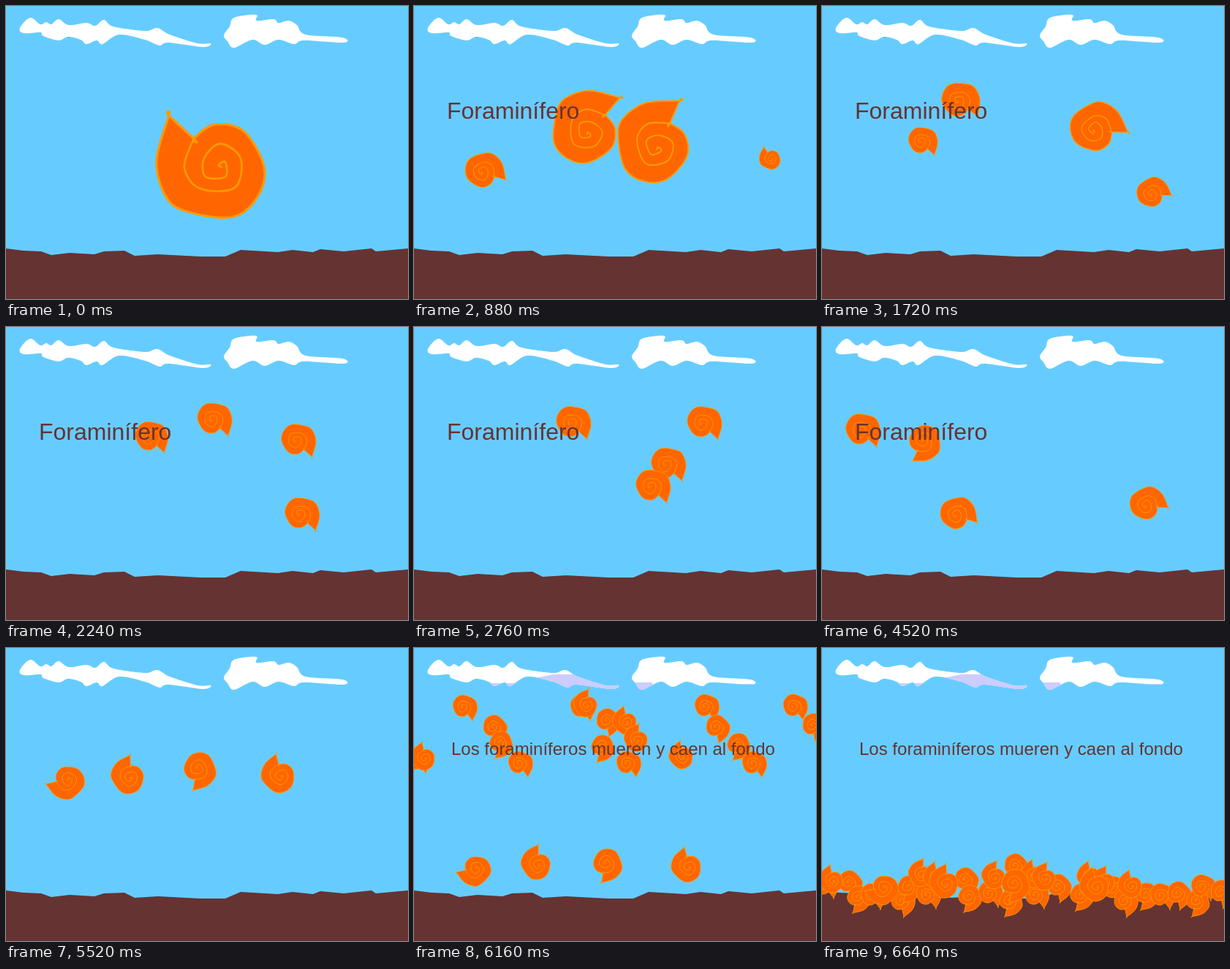
Write an HTML page with a canvas that moves like this. It is 550 px wide and 400 px high and loops after 9.8 s.

```html
<!DOCTYPE html>
<html lang="es">
<head>
<meta charset="utf-8">
<title>Foraminífero</title>
<style>
html, body { margin: 0; width: 100%; height: 100%; overflow: hidden; background: #6cf; }
canvas { display: block; }
</style>
</head>
<body>
<canvas id="stage" width="550" height="400"></canvas>
<script>
const ctx = document.getElementById('stage').getContext('2d');
const LOOP = 9800, STEP = 40, LAST = 166;
const SKY = '#66ccff', EARTH = '#663333';

// Smooth curve through a flat list of x, y pairs.
function curve(flat, closed) {
  const n = flat.length / 2;
  const at = i => {
    const k = closed ? (i + n) % n : Math.max(0, Math.min(n - 1, i));
    return [flat[2 * k], flat[2 * k + 1]];
  };
  const path = new Path2D();
  path.moveTo(...at(0));
  for (let i = 0; i < (closed ? n : n - 1); i++) {
    const [a, b, c, d] = [at(i - 1), at(i), at(i + 1), at(i + 2)];
    path.bezierCurveTo(b[0] + (c[0] - a[0]) / 6, b[1] + (c[1] - a[1]) / 6,
      c[0] - (d[0] - b[0]) / 6, c[1] - (d[1] - b[1]) / 6, c[0], c[1]);
  }
  return path;
}

function polygon(flat) {
  const path = new Path2D();
  for (let i = 0; i < flat.length; i += 2) path.lineTo(flat[i], flat[i + 1]);
  path.closePath();
  return path;
}

const leftCloud = curve([19,30, 33,16, 47,25, 55,22, 62,25, 72,18, 86,26, 110,23, 122,27,
  134,19, 147,28, 190,34, 207,30, 224,39, 262,51, 280,51, 270,56, 222,50, 210,54, 190,46,
  155,39, 132,52, 124,47, 110,52, 102,46, 85,42, 72,47, 51,41, 47,36, 24,37], true);
const rightCloud = curve([298,40, 306,28, 312,16, 342,12, 343,20, 366,18, 373,23, 387,20,
  398,26, 410,39, 460,43, 462,50, 408,47, 394,52, 373,46, 354,53, 337,46, 312,57, 303,48], true);
const leftShade = polygon([152,44, 190,36, 225,36, 285,45, 285,60, 100,60, 100,48, 135,48]);
const rightShade = new Path2D('M300 47h26v13h-26zM403 49h62v13h-62z');

const ground = polygon([0,331, 24,334, 48,335, 62,340, 87,337, 121,339, 134,335, 162,334,
  176,341, 208,339, 266,342, 300,342, 321,333, 372,336, 392,333, 420,336, 430,332, 462,335,
  500,331, 506,335, 550,331, 550,400, 0,400]);

// The shell is drawn around its spiral centre, at full size with the tip up left.
const CENTRE = [292, 218];
const body = curve([260,184, 223,150, 223,150, 206,212, 220,262, 250,281, 309,288,
  343,262, 353,220, 325,171, 285,162, 257,181], true);
const spiral = curve([257,181, 244,220, 265,249, 313,248, 321,208, 293,188, 271,208,
  273,233, 300,233, 300,213, 291,217, 295,220]);

function drawShell([x, y, scale = .32, turn = 180]) {
  ctx.save();
  ctx.translate(x, y);
  ctx.rotate(turn * Math.PI / 180);
  ctx.scale(scale, scale);
  ctx.translate(-CENTRE[0], -CENTRE[1]);
  ctx.fillStyle = '#ff6600';
  ctx.strokeStyle = '#ff9900';
  ctx.lineWidth = Math.max(2.8, 0.85 / scale);
  ctx.lineJoin = ctx.lineCap = 'round';
  ctx.fill(body);
  ctx.stroke(body);
  ctx.stroke(spiral);
  ctx.restore();
}

// Keys: step, x, y, scale, turn; linear in between, then a straight fall to floorY.
function swimmer(floorY, ...keys) {
  const full = keys.map(([step, x, y, scale = .32, turn = 180]) => [step, x, y, scale, turn]);
  const [, x, y, scale, turn] = full[full.length - 1];
  return [[0, ...CENTRE, 1, 0], ...full, [140, x, y, scale, turn], [157, x, floorY, .28, turn]];
}

const swimmers = [
  swimmer(327, [26, 57, 229, .23], [43, 135, 185, .27], [64, 233, 130], [115, 45, 142],
    [138, 85, 180, .32, 305]),
  swimmer(326, [45, 181, 126], [67.5, 387, 127.4], [89.5, 485, 186.5], [104, 471, 267],
    [113, 443, 244, .32, 141], [138, 376, 175, .32, 33]),
  swimmer(322, [56, 396.5, 155.5], [107, 192.5, 283], [113, 183, 257, .32, 154],
    [138, 170, 177, .32, 45]),
  swimmer(321, [20, 493, 204, .19, 0], [50, 437.5, 273.5], [98, 149.5, 133.3],
    [113, 138, 155, .32, 252], [138, 262, 164, .32, 237])
];

function pose(keys, step) {
  const next = keys.findIndex(key => key[0] > step);
  if (next < 0) return keys[keys.length - 1].slice(1);
  const from = keys[next - 1], to = keys[next];
  const part = (step - from[0]) / (to[0] - from[0]);
  return from.slice(1).map((v, i) => v + (to[i + 1] - v) * part);
}

// Resting places of the heap: tips turned up, then tips turned down or aside.
const tipsUp = [15,318, 137,310, 158,314, 237,313, 291,311, 306,315, 368,313, 387,320, 424,325];
const tipsDown = [3,323, 36,320, 48,340, 67,338, 108,345, 117,326, 143,337, 195,316, 200,339,
  228,335, 263,297, 256,345, 291,337, 322,325, 353,337, 398,328, 413,345, 442,336, 463,338,
  486,335, 512,345, 519,326, 545,333];

function drawHeap(places, step, turnOf) {
  for (let i = 0; i < places.length / 2; i++) {
    const start = 150 + i * 5 % 6;
    if (step <= start) continue;
    const part = Math.min(1, (step - start) / 11);
    drawShell([places[2 * i], 55 + (places[2 * i + 1] - 55) * part, .23, turnOf(i)]);
  }
}

function shade(cloud, area) {
  ctx.save();
  ctx.clip(cloud);
  ctx.fillStyle = '#ccccff';
  ctx.fill(area);
  ctx.restore();
}

function label(text, size, x, y) {
  ctx.fillStyle = EARTH;
  ctx.font = size + 'px "Liberation Sans", Arial, sans-serif';
  ctx.fillText(text, x, y);
}

function draw(step) {
  ctx.fillStyle = SKY;
  ctx.fillRect(0, 0, 550, 400);
  ctx.fillStyle = '#fff';
  ctx.fill(leftCloud);
  ctx.fill(rightCloud);
  if (step > 150) {
    shade(leftCloud, leftShade);
    shade(rightCloud, rightShade);
  }
  ctx.fillStyle = EARTH;
  ctx.fill(ground);
  drawHeap(tipsDown, step, i => 190 + i * 25 % 75);
  drawHeap(tipsUp, step, i => 35 + i * 15 % 30);
  swimmers.forEach(keys => drawShell(pose(keys, step)));
  if (step >= 20 && step < 126) label('Foraminífero', 32, 45, 154);
  if (step >= 140) label('Los foraminíferos mueren y caen al fondo', 24, 51, 146);
}

const begin = performance.now();
function tick() {
  const time = (performance.now() - begin) % LOOP;
  draw(Math.min(LAST, Math.floor(time / STEP)));
  requestAnimationFrame(tick);
}
tick();
</script>
</body>
</html>
```
